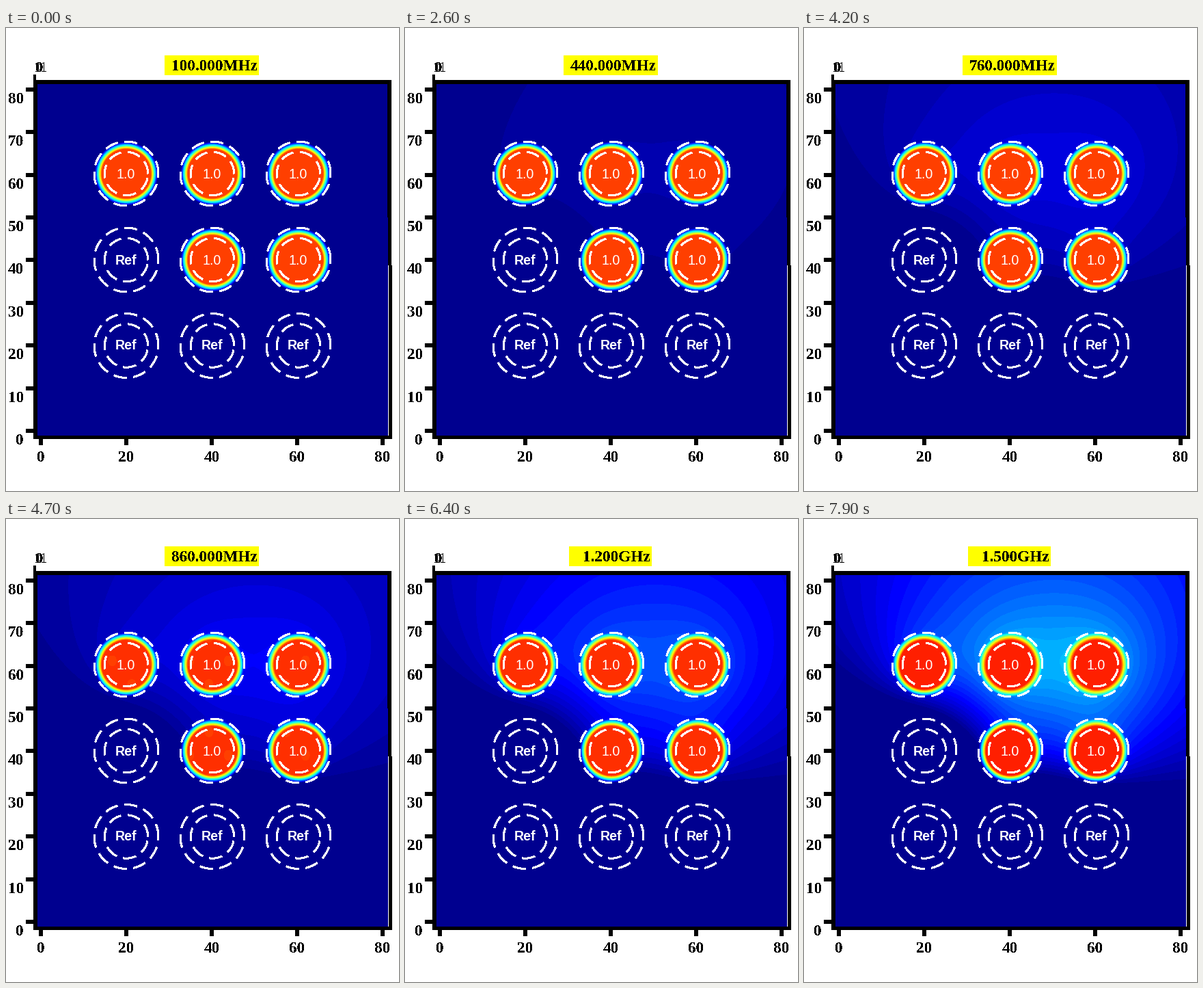
A matplotlib script for the animation above (8 s loop, 575x677 px).

```python
import numpy as np
import matplotlib.pyplot as plt
from matplotlib.animation import FuncAnimation
from matplotlib.patches import Rectangle

W, H, DPI = 575, 677, 100
LEFT, TOP, RIGHT, BOTTOM = 46, 82, 559, 596
COLS, ROWS = (176, 302, 428), (213, 339, 464.5)
HOLD = 9            # steps before the sweep starts to move
STEPS = 80
CORE_R, EDGE_R = 36, 46.5

plt.rcParams["lines.scale_dashes"] = False

signals = [(x, ROWS[0]) for x in COLS] + [(x, ROWS[1]) for x in COLS[1:]]
grounds = [(COLS[0], ROWS[1])] + [(x, ROWS[2]) for x in COLS]

X, Y = np.meshgrid(np.arange(LEFT, RIGHT) + 0.5, np.arange(TOP, BOTTOM) + 0.5)


def dist(center):
    return np.maximum(np.hypot(X - center[0], Y - center[1]), 1)


# Logarithmic potential of the signal vias, balanced by the ground vias
potential = (1.25 * sum(np.log(dist(c)) for c in grounds)
             - sum(np.log(dist(c)) for c in signals) - 0.4)
near = np.min([dist(c) for c in signals], axis=0)
blend = np.clip((EDGE_R - near) / (EDGE_R - CORE_R), 0, 1)
ripple = 0.02 * np.sin(X / 9) * np.cos(Y / 11)


def jet(i):
    def ramp(lo, hi):
        return np.clip(np.minimum(i - lo, hi - i) / 16, 0, 1)
    return np.stack([ramp(23, 71), ramp(7, 55), ramp(-9, 39)], axis=-1)


PALETTE = jet(np.arange(64))


def field(mhz):
    gain = (mhz / 1000) ** 1.77
    plane = np.maximum(2.27 * gain * potential, 0)
    core = 51.2 + gain * (1.06 + ripple)
    level = blend * core + (1 - blend) * plane
    return PALETTE[np.clip(level, 0, 63).astype(int)]


fig = plt.figure(figsize=(W / DPI, H / DPI), dpi=DPI, facecolor="white")
ax = fig.add_axes([0, 0, 1, 1])
image = ax.imshow(field(100), extent=(LEFT, RIGHT, BOTTOM, TOP),
                  interpolation="nearest", aspect="auto", zorder=0)
ax.set_xlim(0, W)
ax.set_ylim(H, 0)
ax.axis("off")


def box(x0, y0, x1, y1, color="black"):
    return ax.add_patch(Rectangle((x0, y0), x1 - x0, y1 - y0, color=color,
                                  lw=0, antialiased=False, zorder=3))


def label(x, y, s, px=23.3, font="Liberation Serif", weight="bold",
          ha="center", color="black"):
    return ax.text(x, y, s, fontsize=px * 72 / DPI, family=font,
                   weight=weight, ha=ha, va="baseline", color=color,
                   antialiased=font != "Liberation Serif", zorder=4)


def ring(cx, cy, r):
    a = np.linspace(0, 2 * np.pi, 241)
    ax.plot(cx + r * np.cos(a), cy - r * np.sin(a), color="white", lw=1.35,
            ls=(0, (13, 7.5)), dash_capstyle="butt", antialiased=False,
            zorder=2)


# Border and ticks
box(40, 76, 46, 601)
box(40, 68, 44, 80)
box(42, 76, 564, 82)
box(42, 596, 565, 601)
box(558, 76, 564, 277)
box(559, 277, 564, 347)
box(560, 347, 565, 601)

for k in range(9):
    y = 589 - 62.4 * k
    box(29, round(y) - 3, 42, round(y) + 3)
    label(26, y + 20, str(10 * k), ha="right")
for k in range(5):
    x = 51 + 125 * k
    box(x - 3, 598, x + 3, 610)
    label(x, 634, str(20 * k))

# Collapsed labels of the third axis
for x, s in ((48, "0"), (47, "1"), (49, "0"), (55, "1")):
    label(x, 64, s, px=21, weight="normal" if x == 55 else "bold")

for group, s, face in ((signals, "1.0", "normal"), (grounds, "Ref", "bold")):
    for cx, cy in group:
        ring(cx, cy, 47)
        ring(cx, cy, 31.7)
        label(cx - 0.7, round(cy) + 6.5, s, px=19.7, font="Liberation Sans",
              weight=face, color="white")

banner = box(232, 40, 370, 69, "#ffff00")
title = label(368, 62, "", ha="right")


def draw(i):
    mhz = 100 + 20 * max(i - HOLD, 0)
    image.set_data(field(mhz))
    if mhz < 1000:
        banner.set_bounds(232, 40, 138, 29)
        title.set_text(f"{mhz:.3f}MHz")
        title.set_x(368)
    else:
        banner.set_bounds(240, 40, 121, 29)
        title.set_text(f"{mhz / 1000:.3f}GHz")
        title.set_x(359)
    return image, banner, title


anim = FuncAnimation(fig, draw, frames=STEPS, interval=100, repeat=True,
                     repeat_delay=0, blit=False)
plt.show()
```
